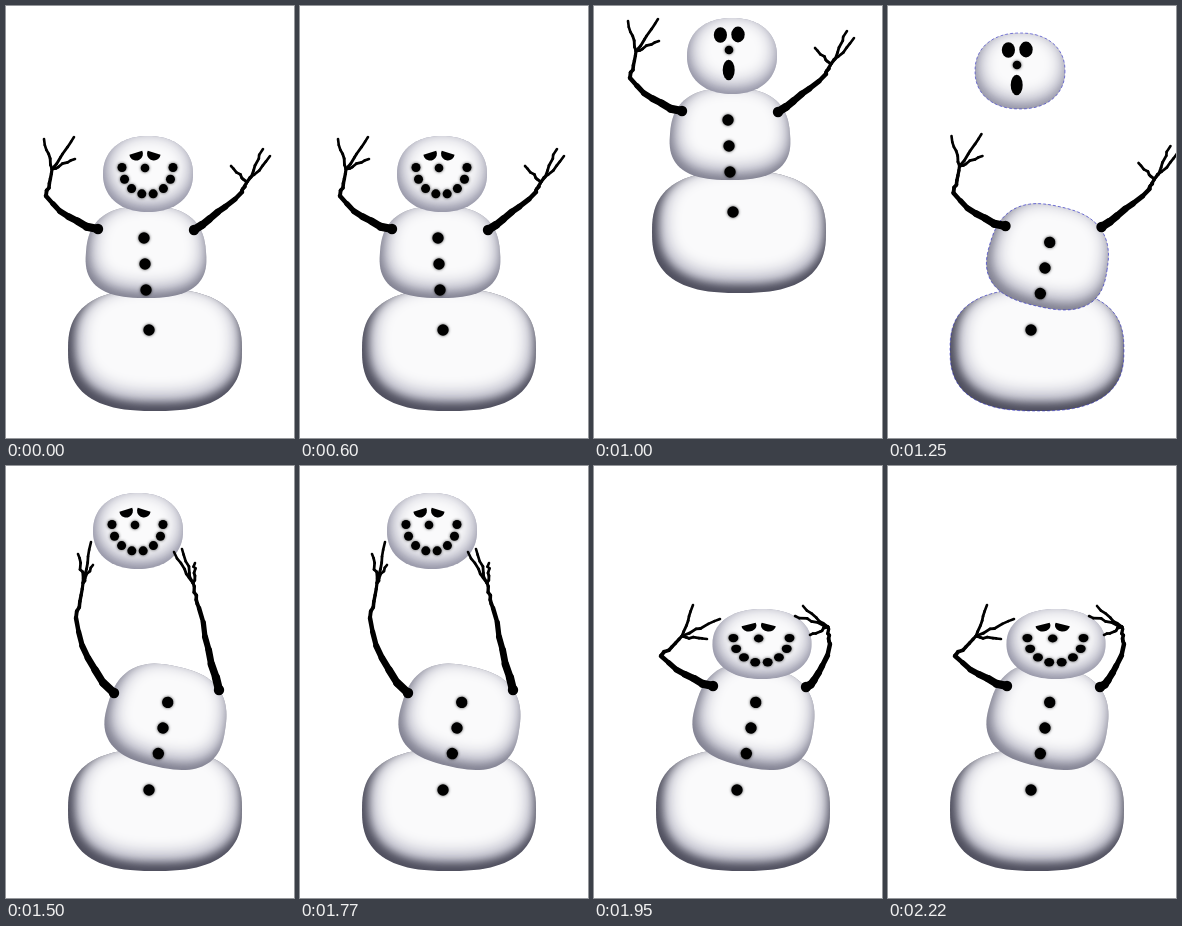
Animation, 288 px wide and 432 px high, one loop 2.4 s. Source, as an HTML page with a canvas:

```html
<!DOCTYPE html>
<html lang="en">
<head>
<meta charset="utf-8">
<title>Snowman</title>
<style>
html, body { margin: 0; width: 100%; height: 100%; overflow: hidden; background: #fff; }
canvas { display: block; width: 288px; height: 432px; }
</style>
</head>
<body>
<canvas id="stage" width="288" height="432"></canvas>
<script>
const ctx = document.getElementById('stage').getContext('2d');
const FAR = 2000;
const BLUE = 'rgba(40,40,210,.7)';

let seed;
const jitter = size => {
  seed = (seed * 16807) % 2147483647;
  return (seed / 2147483647 - .5) * size;
};

function placed(x, y, draw, { sx = 1, sy = 1, turn = 0 } = {}) {
  ctx.save();
  ctx.translate(x, y);
  ctx.rotate(turn);
  ctx.scale(sx, sy);
  draw();
  ctx.restore();
}

// Squarish ellipse around x, y; taper makes the lower half wider.
function blob(x, y, rx, ry, { power, taper }) {
  const path = new Path2D();
  const bend = v => Math.sign(v) * Math.abs(v) ** (2 / power);
  for (let a = 0; a < Math.PI * 2; a += Math.PI / 48) {
    const v = bend(Math.sin(a));
    path.lineTo(x + rx * bend(Math.cos(a)) * (1 + taper * v), y + ry * v);
  }
  path.closePath();
  return path;
}

// Paints only the blurred shadow of a shape.
function softFill(path, color, blur) {
  ctx.save();
  const m = ctx.getTransform();
  ctx.setTransform(m.a, m.b, m.c, m.d, m.e + FAR, m.f);
  ctx.shadowOffsetX = -FAR;
  ctx.shadowBlur = blur;
  ctx.shadowColor = color;
  ctx.fill(path);
  ctx.restore();
}

// Dark snow with two lighter layers, each smaller and shifted up.
function ball(rx, ry, shape, deep, edge) {
  const path = blob(0, 0, rx, ry, shape);
  const layer = (size, lift, color, blur) =>
    softFill(blob(rx * .03, -ry * lift, rx * size, ry * size, shape), color, blur);
  ctx.save();
  ctx.fillStyle = deep;
  ctx.fill(path);
  ctx.clip(path);
  layer(.94, .09, '#b9b9c7', 8);
  layer(.87, .17, '#fafafb', 15);
  ctx.restore();
  if (edge) {
    ctx.save();
    ctx.strokeStyle = edge;
    ctx.lineWidth = .8;
    ctx.setLineDash([2, 3]);
    ctx.stroke(path);
    ctx.restore();
  }
}

function oval(x, y, rx, ry = rx) {
  ctx.beginPath();
  ctx.ellipse(x, y, rx, ry, 0, 0, Math.PI * 2);
  ctx.fill();
}

function coal(x, y, r) {
  ctx.save();
  ctx.fillStyle = '#000';
  ctx.shadowColor = 'rgba(0,0,0,.7)';
  ctx.shadowBlur = 3;
  oval(x, y, r);
  ctx.restore();
}

function smile() {
  for (const side of [-1, 1]) {
    placed(-3 + side * 8.8, -20, () => {
      ctx.beginPath();
      ctx.ellipse(0, 0, 6.8, 6.5, 0, -.2, Math.PI + .2);
      ctx.fill();
    }, { turn: side * .3 });
  }
  for (let i = 0; i < 8; i++) {
    const a = Math.PI * i / 7;
    coal(-.5 + 25.5 * Math.cos(a), -6.5 + 27 * Math.sin(a), 4.5);
  }
}

function shock() {
  oval(-11.6, -21, 6.6, 7.8);
  oval(6, -21.5, 6.7, 7.9);
  oval(-3.3, 14, 6, 10.3);
}

function head(face, edge) {
  ball(45, 38, { power: 2.2, taper: 0 }, '#9292a4', edge);
  ctx.fillStyle = '#000';
  face();
  coal(-3, -6, 4.3);
}

function base(edge) {
  placed(149, 344, () => {
    ball(87, 61, { power: 2.6, taper: 0 }, '#50505f', edge);
    coal(-6, -20, 5.7);
  });
}

function torso(height, edge) {
  ball(60, height, { power: 2.6, taper: .06 }, '#828292', edge);
  for (let i = 0; i < 3; i++) coal(i - 2, i * 26 - 14, 5.7);
}

// A rough stick along a curve, thinning from one width to another.
function stick([ax, ay], [bx, by], [cx, cy], from, to, rough) {
  const steps = 6;
  let last = [ax, ay];
  for (let i = 1; i <= steps; i++) {
    const t = i / steps, u = 1 - t, shake = i < steps ? rough : 0;
    const next = [
      u * u * ax + 2 * u * t * bx + t * t * cx + jitter(shake),
      u * u * ay + 2 * u * t * by + t * t * cy + jitter(shake)
    ];
    ctx.lineWidth = from + (to - from) * t;
    ctx.beginPath();
    ctx.moveTo(...last);
    ctx.lineTo(...next);
    ctx.stroke();
    last = next;
  }
}

const middle = (a, b) => [(a[0] + b[0]) / 2, (a[1] + b[1]) / 2];

function arm({ shoulder, elbow, wrist, fork, tips }) {
  ctx.strokeStyle = ctx.fillStyle = '#000';
  ctx.lineCap = ctx.lineJoin = 'round';
  oval(...shoulder, 5.2);
  stick(shoulder, elbow, wrist, 9, 4.5, 2);
  stick(wrist, middle(wrist, fork), fork, 4, 3.2, 2);
  tips.forEach(tip => stick(fork, middle(fork, tip), tip, 3, 2.6, 3));
}

function arms(pair) {
  seed = 4021;
  pair.forEach(arm);
}

const raised = [
  { shoulder: [92, 223], elbow: [60, 215], wrist: [40, 190], fork: [46, 163],
    tips: [[38, 133], [68, 131], [69, 153]] },
  { shoulder: [188, 224], elbow: [212, 208], wrist: [236, 186], fork: [241, 176],
    tips: [[264, 150], [257, 143], [225, 160]] }
];

const reaching = [
  { shoulder: [108, 227], elbow: [76, 195], wrist: [70, 152], fork: [77, 117],
    tips: [[85, 76], [72, 88], [87, 99]] },
  { shoulder: [213, 224], elbow: [203, 185], wrist: [193, 142], fork: [187, 117],
    tips: [[168, 86], [189, 97], [176, 83]] }
];

const bent = [
  { shoulder: [119, 220], elbow: [90, 212], wrist: [67, 190], fork: [88, 170],
    tips: [[99, 139], [126, 153], [113, 173]] },
  { shoulder: [212, 221], elbow: [226, 215], wrist: [236, 178], fork: [234, 161],
    tips: [[209, 140], [201, 150], [216, 169]] }
];

function upright(face) {
  base();
  placed(140, 246, () => torso(46));
  placed(142, 168, () => head(face));
  arms(raised);
}

function leaning(edge) {
  base(edge);
  placed(160.6, 250.5, () => torso(51, edge), { turn: .22 });
}

const poses = [
  { until: 1000, draw: () => upright(smile) },
  { until: 1250, draw: () => placed(-4, -118, () => upright(shock)) },
  { until: 1500, draw() {
    leaning(BLUE);
    placed(132, 65, () => head(shock, BLUE));
    placed(25.5, -3, () => arms(raised));
  } },
  { until: 1950, draw() {
    leaning();
    placed(132, 65, () => head(smile));
    arms(reaching);
  } },
  { until: 2400, draw() {
    leaning();
    placed(168, 178, () => head(smile), { sx: 1.1, sy: .92 });
    arms(bent);
  } }
];

let shown;
function tick() {
  const t = performance.now() % 2400;
  const pose = poses.find(p => t < p.until);
  if (pose !== shown) {
    shown = pose;
    ctx.fillStyle = '#fff';
    ctx.fillRect(0, 0, 288, 432);
    pose.draw();
  }
  requestAnimationFrame(tick);
}
tick();
</script>
</body>
</html>
```
